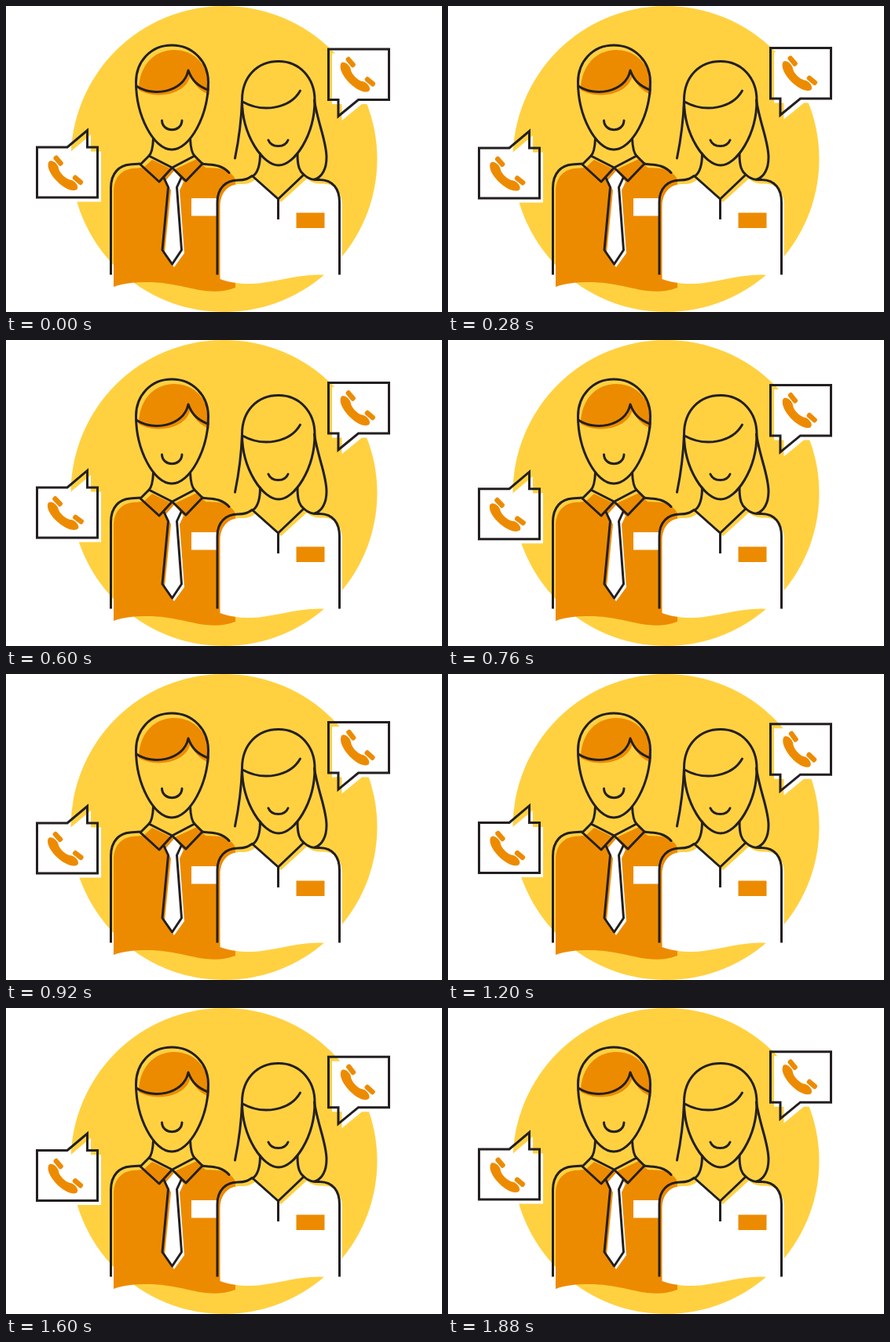
An HTML page for the animation above (1.92 s loop, 555 px wide and 390 px high).

```html
<!DOCTYPE html>
<html lang="en">
<head>
<meta charset="utf-8">
<title>Customer service team</title>
<style>
  html, body { margin: 0; width: 100%; height: 100%; overflow: hidden; background: #fff; }
  svg { display: block; width: 555px; height: 390px; }
  .line { fill: none; stroke: #231f20; stroke-width: 3; stroke-linecap: round; }
  .flat { stroke-linecap: butt; }
  .orange { fill: #ed8b00; }
  .white { fill: #fff; }
</style>
</head>
<body>
<svg viewBox="0 0 555 390">
  <defs>
    <g id="phone" class="orange" transform="rotate(45)">
      <path d="M-25 5C-26-1-14-2-10 2C-5 5 5 5 10 2C14-2 26-1 25 5C20 18-20 18-25 5Z"/>
      <rect x="-7.500" y="-3.250" width="15" height="6.500" rx="2.500" transform="translate(-17.500 -5) rotate(5)"/>
      <rect x="-7.500" y="-3.250" width="15" height="6.500" rx="2.500" transform="translate(17.500 -5) rotate(-5)"/>
    </g>
    <path id="leftBox" d="M39.500 180H78L103.500 158.500V180H116.500V244H39.500Z"/>
    <path id="rightBox" d="M410.500 55H487.500V119.500H448.500L423 140.500V119.500H410.500Z"/>
  </defs>

  <circle cx="277.500" cy="195" r="195" fill="#ffd141"/>

  <!-- man -->
  <path class="orange" d="M169 107C169 77 188 56 214 56C240 56 258 76 259 102V113C248 109 239 101 235 88C229 115 188 119 169 107Z"/>
  <path class="orange" d="M137 358V237C137 217 149 208 162 207C169 206.500 172 206 175 206L186 196L213 209L243 195L254 206C264 207 284 204 292 221V359C254 373 229 352 180 352C164 352 150 353 137 358Z"/>
  <path class="white" d="M214 210L203.500 222L210 235L202 314L214 333L227 315L221 235L226 224Z"/>
  <path class="white" d="M236 245H269V267.500H236Z"/>
  <g class="line" stroke-linejoin="round">
    <path d="M165.500 97C165.500 71 184 50 211 50S257.500 71 257.500 97C257.500 140 234 183 211 183S165.500 140 165.500 97Z"/>
    <path d="M166 102C185 115.500 226 111.500 232 82C237 96 245 102 257 107"/>
    <path d="M198.500 146C199 161.500 223.500 161.500 224 146"/>
    <path d="M187.500 169C187 180 186 187 182 191M234.500 169C235 180 236 187 240 191"/>
    <path d="M182 191L171 202L195 224L211.500 206ZM240 191L250 201L229 223L211.500 206Z"/>
    <path d="M201 219L206.500 231L199 311L211.500 329L223.500 311L217.500 231L223 219"/>
    <path class="flat" d="M133.500 342.500V232C133.500 212 145 203 158 202C165 201.500 168 201.500 171 201"/>
    <path d="M250 201C258 203 273 200 284 212.500"/>
  </g>

  <!-- woman -->
  <path class="white" d="M272.500 348V255C273 237 283 227 299 227C309 227 312 225 318 221L350 250L383 220C392 228 398 226 404 226.500C420 227 428 238 428 255V347C388 334 345 354 312 354C295 354 284 352 272.500 348Z"/>
  <path class="orange" d="M369.500 263.500H405.500V283H369.500Z"/>
  <g class="line" stroke-linejoin="round">
    <path d="M300.500 120C300.500 90 320 70.500 347 70.500S393 92 393 120C393 165 367 203 347 203S300.500 165 300.500 120Z"/>
    <path d="M301 122C328 137 362 130 374.500 108"/>
    <path d="M300.500 120C299.500 150 296 172 291.500 194M392.500 120C397 150 408 172 408 193C408 208 402 218 393 221"/>
    <path d="M334 171C338 181 355 181 359 171"/>
    <path d="M323.500 188C323.500 203 320 213 314 217M371 188C371 205 374 211 379 215"/>
    <path d="M314 217L346.500 246L379 215"/>
    <path class="flat" d="M346.500 246V272"/>
    <path class="flat" d="M269 342.500V250C269 232 280 222 295 222C305 222 308 220 314 216M379 215C388 223 394 221 400 221.500C416 222 424.500 233 424.500 250V342.500"/>
  </g>

  <!-- speech bubbles -->
  <g id="left">
    <use href="#leftBox" class="white" x="4.500" y="5.500"/>
    <use href="#leftBox" class="line"/>
    <g id="leftPhone"><use href="#phone"/></g>
  </g>
  <g id="right">
    <use href="#rightBox" class="white" x="4.500" y="5.500"/>
    <use href="#rightBox" class="line"/>
    <g id="rightPhone"><use href="#phone"/></g>
  </g>
</svg>
<script>
  const LOOP = 1920, STEP = 40;
  const move = (id, value) => document.getElementById(id).setAttribute('transform', value);
  const ease = p => p < .5 ? 4 * p ** 3 : 1 - 4 * (1 - p) ** 3;

  // Eased rise and fall, 0 -> 1 -> 0 over one loop
  const bob = t => {
    const p = ((t + LOOP) % LOOP) / LOOP * 2;
    return ease(p < 1 ? p : 2 - p);
  };
  // Smooth bump, 1 at the given peak time
  const bump = (t, peak) => Math.cos(Math.PI * (t - peak) / LOOP) ** 4;

  function draw(now) {
    const t = Math.floor(now % LOOP / STEP) * STEP;
    move('left', `translate(0 ${10 * bob(t)})`);
    move('right', `translate(0 ${10.2 * bob(t - 320) - 1.5})`);
    move('leftPhone', `translate(75.5 213) rotate(${-4 * bump(t, 660)})`);
    move('rightPhone', `translate(447.5 87.5) rotate(${4 * bump(t, 1220)})`);
  }

  const start = performance.now();
  function tick() {
    draw(performance.now() - start);
    requestAnimationFrame(tick);
  }
  tick();
</script>
</body>
</html>
```
